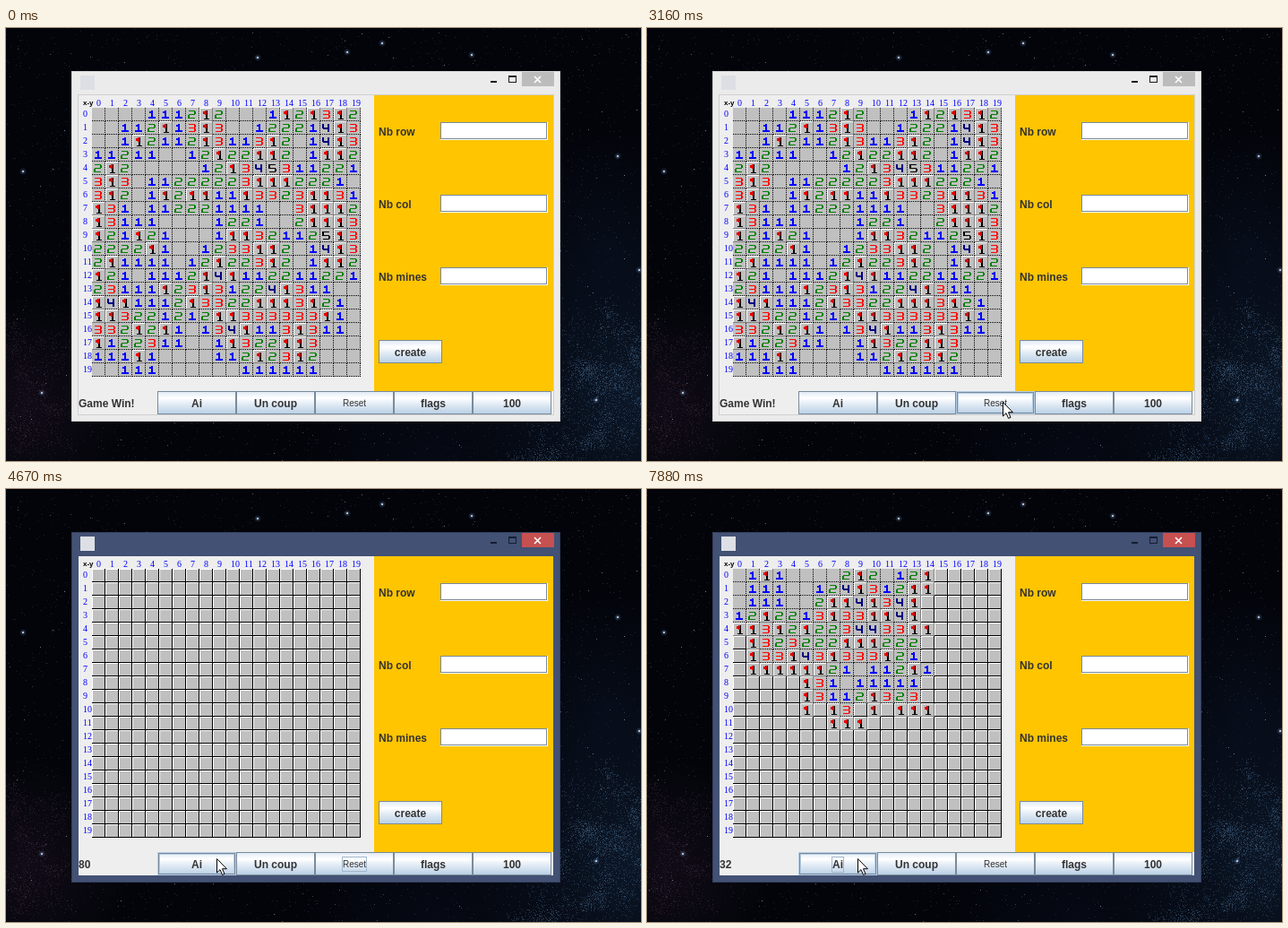
Write an HTML page with a canvas that moves like this. It is 709 px wide and 483 px high and loops after 8 s.

```html
<!DOCTYPE html>
<html lang="en">
<head>
<meta charset="utf-8">
<title>Minesweeper solver</title>
<style>
html, body { margin: 0; width: 709px; height: 483px; overflow: hidden; background: #03040a; }
canvas { display: block; }
</style>
</head>
<body>
<canvas id="stage" width="709" height="483"></canvas>
<script>
const LOOP = 8000, W = 709, H = 483, N = 20, CELL = 15, GX = 96, GY = 89;
const ctx = document.getElementById('stage').getContext('2d');
const SANS = '"Liberation Sans", Arial, sans-serif';
const SERIF = '"Liberation Serif", "Times New Roman", serif';
const BOLD = 'bold 12px ' + SANS;

// Boards: '#' closed, 'F' flag, '.' open and empty, digits as shown.
const pad = rows => Array.from({ length: N }, (_, r) => (rows[r] || '').padEnd(N, '#'));
const won = pad([
  '....1112F2...1F2F3F2', '..112F13F3..122214F3', '..1F2112F3113F2.14F3',
  '11211..12F22FF2.1FF2', '2F2.....12F345311221', '3F3.11222223FFF2221.',
  '3F2.1F2FF11F3323FF31', 'F31.112221111..3FFF2', 'F3111....1221..2FFF3',
  'F21F21...1FF321125F3', '2222F1..1233FF2.14F3', '2F1111.12F223F2.1FF2',
  'F21.1112F4F112211221', '23111F23F31224F311..', 'F4F1112F3322FFF3F21.',
  'FF3221212FF333333F1.', '332F2F1.134F113F311.', 'F122311..1F322FF3...',
  '111F1....112F23F2...', '..111......111111...'
]);
const closed = pad([]);
const first = pad(['.1F', '.1F', '.1', '12F', 'FFF']);
const second = pad(['.1F1', '.1F', '.11', '12F', 'FFF']);
const middle = pad([
  '.1F1....2FFF', '.1#1..124F3F', '.111..2FF4FF', '12F2213F#FF',
  'FF#F2F22F', '###23222FF', '###FF#FF3F', '#######FFF'
]);
const last = pad([
  '.1F1....2F2.12F', '.111..124F312FF', '.111..2FF4F34F', '12F2213F33FF4F',
  'FF3F2F2234433FF', '#F323222FFF222', '#F33F43F333F21', '#FFFFFF21.112F1',
  '#####F31.11111', '#####F3112F323', '#####F#F3#F#FFF', '#######FFF'
]);

// The solver sweeps outwards: take the next board up to a column and a row.
const sweep = (from, to, col, row) => from.map((line, r) =>
  r > row ? line : to[r].slice(0, col + 1) + line.slice(col + 1));

const boards = [
  [0, won], [3840, closed], [5970, first], [6110, second],
  [6430, sweep(second, middle, 9, 4)], [6700, sweep(second, middle, 10, 6)],
  [6970, middle], [7120, sweep(middle, last, 11, 9)],
  [7420, sweep(middle, last, 13, 10)], [7730, sweep(middle, last, 14, 10)],
  [7880, last]
];

const pointer = [
  [0, -50, -50], [980, 419, 295], [1120, 389, 256], [1410, 378, 263],
  [1550, 370, 271], [1670, 358, 284], [1790, 346, 298], [1920, 336, 312],
  [2060, 325, 334], [2190, 320, 356], [2310, 324, 374], [2460, 354, 405],
  [2620, 385, 425], [2770, 392, 427], [2890, 397, 423], [3030, 397, 420],
  [3160, 397, 417], [4100, 325, 417], [4230, 272, 414], [4380, 246, 412],
  [4510, 236, 411], [4670, 235, 412]
];

const at = (list, t) => list.reduce((hit, step) => step[0] <= t ? step : hit);

function box(x, y, w, h, color) {
  ctx.fillStyle = color;
  ctx.fillRect(x, y, w, h);
}

function frame(x, y, w, h, color) {
  ctx.strokeStyle = color;
  ctx.lineWidth = 1;
  ctx.strokeRect(x + .5, y + .5, w - 1, h - 1);
}

function text(str, x, y, font = BOLD, color = '#333333', align = 'left') {
  ctx.font = font;
  ctx.fillStyle = color;
  ctx.textAlign = align;
  ctx.fillText(str, x, y);
}

function makeSky() {
  const sky = document.createElement('canvas');
  sky.width = W;
  sky.height = H;
  const c = sky.getContext('2d');
  let seed = 77;
  const rnd = () => (seed = seed * 16807 % 2147483647) / 2147483647;
  const bell = () => rnd() + rnd() + rnd() - 1.5;
  const glow = (x, y, r, rgb, a) => {
    const g = c.createRadialGradient(x, y, 0, x, y, r);
    g.addColorStop(0, `rgba(${rgb},${a})`);
    g.addColorStop(1, `rgba(${rgb},0)`);
    c.fillStyle = g;
    c.fillRect(x - r, y - r, 2 * r, 2 * r);
  };
  const dot = (x, y, rgb, a) => {
    c.fillStyle = `rgba(${rgb},${a})`;
    c.fillRect(x | 0, y | 0, 1, 1);
  };
  c.fillStyle = '#03040a';
  c.fillRect(0, 0, W, H);
  glow(700, 410, 190, '22,46,76', .45);
  glow(670, 240, 130, '12,26,48', .35);
  glow(480, 490, 150, '10,18,36', .4);
  glow(20, 420, 120, '36,22,40', .4);
  // Nebulae are clumps of fine dust.
  for (let i = 0; i < 110; i++) {
    const k = rnd(), cx = 720 - 110 * k + 60 * bell(), cy = 310 + 170 * k + 50 * bell();
    const size = 8 + 16 * rnd();
    for (let j = 0; j < 55; j++)
      dot(cx + size * bell(), cy + size * bell(), '85,125,165', .1 + .3 * rnd());
  }
  for (let i = 0; i < 45; i++) {
    const cx = 80 * rnd(), cy = 330 + 150 * rnd(), size = 8 + 14 * rnd();
    for (let j = 0; j < 35; j++)
      dot(cx + size * bell(), cy + size * bell(), '110,75,95', .08 + .2 * rnd());
  }
  for (let i = 0; i < 5000; i++) dot(rnd() * W, rnd() * H, '120,140,175', .26 * rnd());
  for (let i = 0; i < 260; i++) dot(rnd() * W, rnd() * H, '180,200,230', .15 + .5 * rnd());
  [[420, 17], [520, 30], [281, 33], [381, 27], [683, 143], [707, 270],
   [659, 415], [40, 407], [19, 160]].forEach(([x, y]) => {
    glow(x, y, 4, '120,155,200', .5);
    c.fillStyle = '#a9bdd6';
    c.fillRect(x - 1, y - 1, 2, 2);
  });
  return sky;
}
const sky = makeSky();

function drawWindow(active) {
  box(73, 48, 546, 391, active ? '#35415f' : '#d2d2d2');
  box(74, 49, 544, 389, active ? '#425174' : '#ebebeb');
  box(83, 53, 16, 16, '#dcdfe4');
  const ink = active ? '#161d30' : '#1c1c1c';
  box(541, 59, 7, 2, ink);
  frame(561, 53, 9, 8, ink);
  box(561, 53, 9, 2, ink);
  box(576, 49, 36, 16, active ? '#c75050' : '#bcbcbc');
  ctx.strokeStyle = '#ffffff';
  ctx.lineWidth = 1.6;
  ctx.beginPath();
  ctx.moveTo(590, 54); ctx.lineTo(597, 61);
  ctx.moveTo(597, 54); ctx.lineTo(590, 61);
  ctx.stroke();
  if (!active) box(80, 74, 532, 358, '#d0d0d0');
  box(81, 75, 530, 356, '#eeeeee');
  box(411, 75, 200, 330, '#ffc500');
}

function drawButton(label, x, y, w, { hover, pressed, focus, small } = {}) {
  const h = 26, mid = x + w / 2, dark = '#7a8a99', soft = '#b8cfe5';
  const g = ctx.createLinearGradient(0, y, 0, y + h);
  [[0, '#dde8f3'], [.3, '#ffffff'], [.6, '#dde8f3'], [1, soft]]
    .forEach(stop => g.addColorStop(...stop));
  box(x, y, w, h, pressed ? soft : g);
  if (hover && !pressed) {
    frame(x, y, w, h, soft);
    frame(x + 1, y + 1, w - 2, h - 2, dark);
    frame(x + 2, y + 2, w - 4, h - 4, soft);
  } else {
    frame(x, y, w, h, dark);
  }
  if (pressed) {
    box(x, y, w, 2, dark);
    box(x, y, 2, h, dark);
  }
  text(label, mid, y + (small ? 17 : 18), small ? '10px ' + SANS : BOLD, '#333333', 'center');
  if (focus) {
    const half = Math.round(ctx.measureText(label).width / 2) + 1;
    frame(mid - half, y + 5, 2 * half, small ? 17 : 18, '#a3b8cc');
  }
}

function drawForm() {
  ['Nb row', 'Nb col', 'Nb mines'].forEach((label, i) => {
    const y = 105 + 81 * i;
    text(label, 416, y + 15);
    box(485, y, 120, 20, '#ffffff');
    frame(485, y, 119, 19, '#7a8a99');
  });
  drawButton('create', 416, 348, 71);
}

const INK = ['', '#0000ff', '#008000', '#ff0000', '#000080', '#000000'];
// Each letter names one bar of a digit: left, top, width, height.
const BAR = {
  a: [3, 3, 7, 1], g: [3, 7, 7, 1], d: [3, 11, 7, 1],
  f: [2, 3, 2, 5], b: [9, 4, 2, 3], e: [2, 8, 2, 4], c: [9, 8, 2, 3],
  i: [6, 3, 2, 9], j: [4, 4, 2, 2], k: [3, 10, 8, 2], m: [3, 7, 7, 2], n: [8, 3, 2, 9]
};
const DIGIT = ['', 'ijk', 'abged', 'abgcd', 'fmn', 'afgcd'];

function drawTile(x, y, flagged) {
  const edge = flagged ? '#808080' : '#000000';
  box(x, y, CELL, 1, '#ffffff');
  box(x, y, 1, CELL, '#ffffff');
  box(x, y + 14, CELL, 1, edge);
  box(x + 14, y, 1, CELL, edge);
  if (!flagged) return;
  box(x + 7, y + 3, 2, 9, '#000000');
  box(x + 5, y + 12, 6, 1, '#000000');
  box(x + 4, y + 4, 2, 3, '#e00000');
  box(x + 6, y + 3, 2, 5, '#e00000');
}

function drawCell(kind, x, y) {
  box(x, y, CELL, CELL, '#c0c0c0');
  if (kind === '#' || kind === 'F') return drawTile(x, y, kind === 'F');
  for (let i = 0; i < CELL; i += 2) {
    box(x + i, y + 14, 1, 1, '#000000');
    box(x + 14, y + i, 1, 1, '#000000');
  }
  for (const s of DIGIT[kind] || '') {
    const [dx, dy, w, h] = BAR[s];
    box(x + dx, y + dy, w, h, INK[kind]);
  }
}

function drawBoard(board) {
  text('x-y', 86, 86, 'bold 8px ' + SANS, '#000000');
  for (let i = 0; i < N; i++) {
    text(i, GX + CELL * i + 5, 87, '10px ' + SERIF, '#0000ff');
    text(i, 86, GY + CELL * i + 10, '10px ' + SERIF, '#0000ff');
  }
  board.forEach((line, r) => [...line].forEach((kind, c) =>
    drawCell(kind, GX + CELL * c, GY + CELL * r)));
}

const arrow = new Path2D('M.5 .5V16L4 12.6 6.6 18.4 9 17.4 6.5 11.7H11.4Z');

function drawPointer(x, y) {
  ctx.save();
  ctx.translate(x, y);
  ctx.fillStyle = '#ffffff';
  ctx.fill(arrow);
  ctx.strokeStyle = '#000000';
  ctx.lineWidth = 1;
  ctx.stroke(arrow);
  ctx.restore();
}

function draw(t) {
  const board = at(boards, t)[1];
  const [, px, py] = at(pointer, t);
  const flags = board.join('').split('F').length - 1;
  ctx.drawImage(sky, 0, 0);
  drawWindow(t >= 3720);
  drawForm();
  drawBoard(board);
  text(board === won ? 'Game Win!' : 80 - flags, 81, 423);
  ['Ai', 'Un coup', 'Reset', 'flags', '100'].forEach((label, i) => {
    const x = 169 + 88 * i;
    drawButton(label, x, 405, 88, {
      small: i === 2,
      hover: px >= x && px < x + 88 && py > 405 && py < 431,
      pressed: i === 2 && t >= 3720 && t < 3840 || i === 0 && t >= 5510 && t < 5660,
      focus: i === 2 && t >= 3720 && t < 5510 || i === 0 && t >= 5510
    });
  });
  drawPointer(px, py);
}

const start = performance.now();
function tick() {
  draw((performance.now() - start) % LOOP);
  requestAnimationFrame(tick);
}
tick();
</script>
</body>
</html>
```
